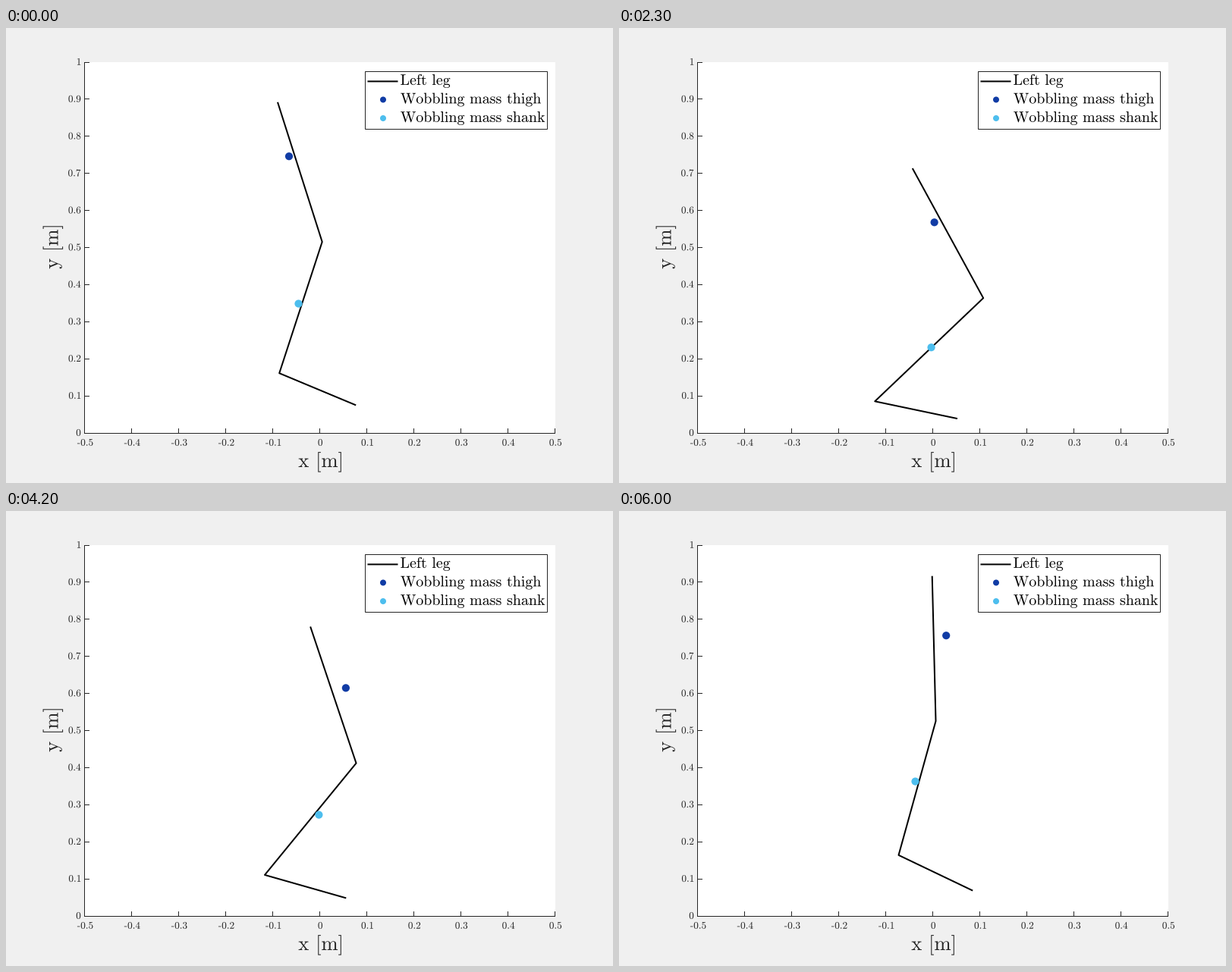
Animation of 800x600 px, one loop 6.1 s. Source, as a matplotlib script:

```python
import numpy as np
import matplotlib.pyplot as plt
from matplotlib.animation import FuncAnimation
from matplotlib.patches import Circle, PathPatch, Rectangle
from matplotlib.path import Path
from matplotlib.textpath import TextPath
from matplotlib.transforms import Affine2D

plt.rcParams["mathtext.fontset"] = "cm"

FRAMES, STEP = 61, 100
PT = 0.72  # points per pixel at 100 dpi
TEX = 96 / 72.27  # pixels per TeX point
INK = (0.15, 0.15, 0.15)
THIGH, SHANK = "#113ca5", "#4dbeee"
LEFT, TOP, WIDTH, HEIGHT = 104, 45, 620, 489
BASE = TOP + HEIGHT

fig = plt.figure(figsize=(8, 6), dpi=100, facecolor="#f0f0f0")
ax = fig.add_axes([0, 0, 1, 1])
ax.set_xlim(0, 800)
ax.set_ylim(600, 0)
ax.axis("off")


def bar(x, y, w, h, color=INK):
    ax.add_patch(Rectangle((x, y), w, h, fc=color, lw=0, antialiased=False))


def dot(x, y, r, color):
    return ax.add_patch(Circle((x, y), r, fc=color, lw=0, zorder=4))


def glyphs(s, size):
    """Outline of a string in the roman math face, with a short hyphen."""
    body = s.lstrip("-").replace(" ", r"\hspace{0.38}")
    path = TextPath((0, 0), rf"$\mathrm{{{body}}}$", size=size)
    if s.startswith("-"):
        dash = Affine2D().scale(0.265, 0.058).translate(0.011, 0.187).scale(size)
        shifted = path.transformed(Affine2D().translate(0.333 * size, 0))
        path = Path.make_compound_path(
            Path.unit_rectangle().transformed(dash), shifted)
    return path


def label(s, x, y, points, align=0.5, color=INK, turn=0):
    """Place text on baseline y; align 0, 0.5, 1 = left, centre, right."""
    path = glyphs(s, points * TEX)
    box = path.get_extents()
    start = box.x0 + align * box.width
    place = Affine2D().translate(-start, 0).scale(1, -1).rotate_deg(-turn)
    path = path.transformed(place.translate(x, y))
    ax.add_patch(PathPatch(path, fc=color, lw=0, zorder=5))


def draw_axes():
    bar(LEFT, TOP, WIDTH, HEIGHT, "white")
    bar(LEFT - 1, BASE, WIDTH + 1, 1)
    bar(LEFT - 1, TOP, 1, HEIGHT + 1)
    for k in range(11):
        x = LEFT + k * WIDTH // 10
        y = BASE - k * HEIGHT / 10
        bar(x - 1, BASE - 6, 1, 7)
        bar(LEFT - 1, int(y + 1e-6), 7, 1)
        label("0" if k == 5 else f"{(k - 5) / 10:.1f}", x + 0.2, 550.8, 10)
        label(f"{k / 10:g}", 98.3, y + 3.8, 10, align=1)
    label("x [m]", 413.7, 579, 20)
    label("y [m]", 68.5, 289.3, 20, turn=90)


def draw_legend():
    ax.add_patch(Rectangle((472.5, 56.5), 240, 76, fc="white", ec=INK,
                           lw=PT, zorder=2))
    ax.plot([476.5, 516.5], [70.4, 70.4], color="black", lw=2 * PT,
            solid_capstyle="butt", snap=False, zorder=3)
    dot(497, 94.5, 4, THIGH)
    dot(497, 119, 4, SHANK)
    names = ["Left leg", "Wobbling mass thigh", "Wobbling mass shank"]
    for i, name in enumerate(names):
        label(name, 520.2, 75 + 24.5 * i, 15, align=0, color="black")


s = np.linspace(0, 1, FRAMES)

# A brief jolt passes through the whole leg as it takes the load.
u = (s - 0.325) * 10
jolt = u * np.exp(-u * u)


def glide(start, end, *waves):
    """Steady drift plus half-wave harmonics that vanish at both ends."""
    swing = sum(a * np.sin(k * np.pi * s) for k, a in enumerate(waves, 1))
    return start + (end - start) * s + swing


def track(x, y, push=0):
    return np.array([glide(*x) + push * jolt, glide(*y) - 4 * jolt])


hip = track((358, 412.7, 7, 1.6, 2.3), (97.8, 85.7, 91.8, 11.7), push=3)
knee = track((416.7, 417.5, 58.4, 2.7, -1.3), (282, 277, 77.4, 9.8, 2.4), push=15)
ankle = track((360.2, 368.5, -30.6, -1.7, -6), (455.2, 453.8, 38.8, 7.3, 4), push=2)
toe = track((461.2, 466.2, -19.7, -0.7, -3.7), (497.4, 500.6, 17.1, 3.2))
thigh_mass = track((373, 431.2, 29.5, -10.8), (169.2, 164.2, 89.3, 0, -7.7, -3.8))
shank_mass = track((385.5, 390.5, 26.4, -3.4, -3.9), (363.5, 356.6, 60.9, 7.7))
joints = np.array([hip, knee, ankle, toe])

draw_axes()
draw_legend()
leg, = ax.plot([], [], color="black", lw=2 * PT, zorder=3,
               solid_capstyle="butt", solid_joinstyle="round")
thigh_dot = dot(0, 0, 5.1, THIGH)
shank_dot = dot(0, 0, 5.1, SHANK)


def update(n):
    leg.set_data(joints[:, 0, n], joints[:, 1, n])
    thigh_dot.set_center(thigh_mass[:, n])
    shank_dot.set_center(shank_mass[:, n])
    return leg, thigh_dot, shank_dot


anim = FuncAnimation(fig, update, frames=FRAMES, interval=STEP,
                     repeat=True, repeat_delay=0)
plt.show()
```
